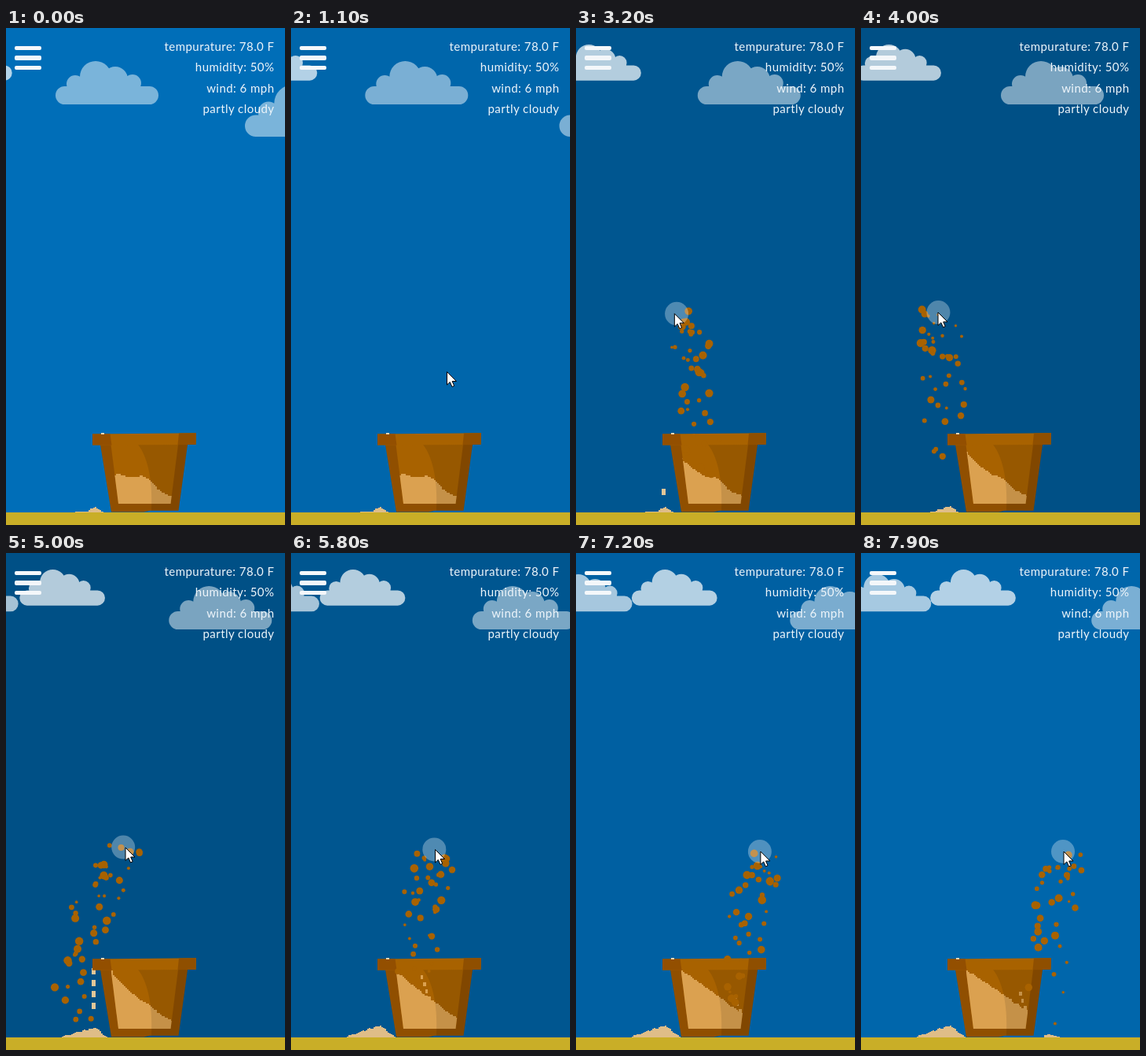
An HTML page with a canvas for the animation above (8 s loop, 355 px wide and 631 px high).

```html
<!DOCTYPE html>
<html lang="en">
<head>
<meta charset="utf-8">
<title>Flower pot weather</title>
<style>
  html, body { margin: 0; width: 100%; height: 100%; overflow: hidden; background: #006eb8; }
  canvas { position: absolute; left: 0; top: 0; }
  .info {
    position: absolute; top: 10px; left: 0; width: 341.5px;
    font: 15px/26.3px Lato, "Open Sans", sans-serif;
    letter-spacing: .45px; text-align: right; color: #eef5fa;
  }
  .bar { position: absolute; left: 11px; width: 34px; height: 5px; border-radius: 2px; background: #f4f7fa; }
</style>
</head>
<body>
<canvas id="stage" width="355" height="631"></canvas>
<div class="info">tempurature: 78.0 F<br>humidity: 50%<br>wind: 6 mph<br>partly cloudy</div>
<div class="bar" style="top:23px"></div>
<div class="bar" style="top:35px;height:6px"></div>
<div class="bar" style="top:48px"></div>
<script>
const ctx = document.getElementById('stage').getContext('2d');
const LOOP = 8000, POUR = 1.6, RATE = 58, GROUND = 615;
const HOLDS = [16, 31, 47, 60, 74]; // steps where the picture pauses

// pointer path: seconds, x, y
const PATH = [[.1, 360, 405], [1.4, 150, 446], [2.1, 150, 409], [2.8, 162, 364],
  [3.4, 107, 362], [4, 98, 361], [4.3, 86, 364], [5, 152, 374], [6.6, 215, 379], [7.9, 258, 379]];

const rand = n => { const s = Math.sin(n * 127.1 + 11.7) * 43758.5453; return s - Math.floor(s); };
const clamp = (v, lo, hi) => Math.max(lo, Math.min(hi, v));
const ramp = (t, from, to) => clamp((t - from) / (to - from), 0, 1);
const mix = (a, b, k) => a + (b - a) * k;

function pointerAt(t) {
  let i = 0;
  while (i < PATH.length - 2 && t > PATH[i + 1][0]) i++;
  const [a, b] = [PATH[i], PATH[i + 1]];
  const k = ramp(t, a[0], b[0]);
  return [mix(a[1], b[1], k), mix(a[2], b[2], k)];
}

// height of the sand in the pot: the first heap, or the slope poured over it
function sandTop(x, t) {
  const u = ramp(x, 134, 210), late = ramp(t, 5, 7.9);
  const heap = 569 + 2 * Math.sin(x / 6) + Math.max(0, x - 170) * .65;
  const left = 566 - 36 * ramp(t, 2.1, 4.8) ** .6;
  const bend = .72 + .28 * Math.min(1, late * 2);
  return Math.min(heap, mix(left, 594 - 13 * late, u ** bend));
}

function rect(color, x, y, w, h) {
  ctx.fillStyle = color;
  ctx.fillRect(x, y, w, h);
}

function trace(pts) {
  ctx.beginPath();
  pts.forEach(p => ctx.lineTo(p[0], p[1]));
  ctx.closePath();
}

function poly(color, pts) {
  ctx.fillStyle = color;
  trace(pts);
  ctx.fill();
}

function disc(color, x, y, r) {
  ctx.fillStyle = color;
  ctx.beginPath();
  ctx.arc(x, y, r, 0, 7);
  ctx.fill();
}

function cloud(x, y, size, alpha) {
  ctx.save();
  ctx.translate(x, y);
  ctx.scale(size, size);
  ctx.fillStyle = `rgba(255,255,255,${alpha})`;
  ctx.beginPath();
  ctx.roundRect(0, 32, 131, 23, 11.5);
  for (const [cx, cy, r] of [[25, 29, 11], [51, 20, 20], [76, 23, 16], [98, 28, 11]]) {
    ctx.moveTo(cx + r, cy);
    ctx.arc(cx, cy, r, 0, 2 * Math.PI);
  }
  ctx.rect(22, 25, 80, 20);
  ctx.fill();
  ctx.restore();
}

function clouds(t) {
  const drift = .1 * t * t;
  cloud(304 + 34 * t, 72, 1.2, .48);
  cloud(63 + 28.35 * t + drift, 42, 1, .48);
  cloud(-101 + 23.15 * t + drift, 21, .83, .7);
  cloud(-224 + 25.4 * t, 27, .86, .65);
}

function pot(t) {
  poly('#904f00', [[120, 529], [231, 529], [219.5, 612.7], [183, 612.7], [175, 614.5], [134, 614.5]]);
  ctx.save();
  trace([[133.5, 529], [219, 529], [209.5, 604], [143, 604]]);
  ctx.clip();
  rect('#a86200', 130, 529, 92, 76);
  for (let x = 134; x < 212; x += 2) {
    const top = Math.round((sandTop(x, t) + rand(x >> 2) * 2 - 1) / 2) * 2;
    rect('#dba150', x, top, 2, 605 - top);
  }
  for (let j = 0; j < 4 && t > 5.4; j++) {
    const x = Math.round(clamp(pointerAt(t - .4)[0] - 8, 165, 198) + j * 3);
    const y = Math.round(sandTop(x, t) - (t * 70 + j * 17) % 24);
    rect('#dba150', x, y, 3 + j % 2, 5);
  }
  ctx.restore();

  // curved shade over the right half
  ctx.fillStyle = 'rgba(0,0,0,.1)';
  ctx.beginPath();
  ctx.moveTo(168, 529);
  ctx.bezierCurveTo(179, 543, 187, 570, 185, 612.7);
  ctx.lineTo(219.5, 612.7);
  ctx.lineTo(231, 529);
  ctx.fill();

  poly('#a86200', [[110, 515.5], [242, 514.2], [241.5, 529], [110, 529.5]]);
  poly('#934f00', [[110, 515.5], [132.5, 515.2], [134.5, 529.5], [110, 529.5]]);
  poly('#8f4f00', [[220, 514.4], [242, 514.2], [241.5, 529], [218.5, 529]]);
  rect('#ead6b4', 121, 514, 4, 2);
}

function heap(from, to, height) {
  for (let x = from; x < to; x += 2) {
    const h = Math.round(height(x) + rand(x >> 2) * 2 - 1);
    if (h > 0) rect('#dfbd88', x, GROUND - h, 2, h);
  }
}

function piles(t) {
  const peak = 7 + 8 * ramp(t, 3.8, 5.6), width = 12 + 34 * ramp(t, 3.6, 4.8);
  heap(67, 134, x => peak * (1 - (x < 112 ? (112 - x) / width : (x - 112) / (peak * 1.35))));
  rect('#dfbd88', 88, GROUND - 1, 36, 1);
  const grow = ramp(t, 7.2, 7.8);
  heap(233, 263, x => grow * (x < 249 ? 3.5 : 1) - .5);

  // sand dripping off the rim
  for (let i = 28; i <= t * 10; i++) {
    const age = t - i / 10;
    const drips = i % 34 === 28 || (i >= 47 && i < 53);
    if (drips && age < .53) rect('#e2c698', 109, Math.round(527 + 145 * age), 5, 8);
  }
}

function soil(t) {
  const last = Math.floor((t - POUR) * RATE);
  for (let i = Math.max(0, last - RATE); i <= last; i++) {
    const born = POUR + i / RATE, age = t - born;
    const [px, py] = pointerAt(born);
    const x = px + (rand(i) - .5) * 54 + (rand(i + 500) - .5) * 16 * age;
    const y = py + (rand(i + 900) - .25) * 24 + 100 * age + 200 * age * age;
    let floor = 608;
    if (x > 134 && x < 214) floor = sandTop(x, t);
    else if (x > 112 && x < 241) floor = 517;
    if (y < floor) disc('#a86200', x, y, 1.7 + 3.6 * rand(i + 1300));
  }
}

function pointer(t) {
  if (t < .1) return;
  if (t >= POUR) disc('rgba(255,255,255,.31)', ...pointerAt(t - .03), 15);
  ctx.save();
  ctx.translate(...pointerAt(t));
  ctx.strokeStyle = '#000';
  poly('#fff', [[0, 0], [0, 16.5], [3.8, 13], [6.5, 19], [9.2, 17.8], [6.7, 12], [12, 12]]);
  ctx.stroke();
  ctx.restore();
}

function sky(t) {
  const gap = Math.abs(t - 4.5);
  rect(`rgb(0,${Math.round(76 + 7.5 * gap)},${Math.round(128 + 12.5 * gap)})`, 0, 0, 355, 631);
}

function draw() {
  let step = Math.floor(performance.now() % LOOP / 100);
  if (HOLDS.includes(step)) step--;
  const t = step / 10;
  sky(t);
  clouds(t);
  rect('#c9ae27', 0, GROUND, 355, 16);
  piles(t);
  pot(t);
  soil(t);
  pointer(t);
  requestAnimationFrame(draw);
}
draw();
</script>
</body>
</html>
```
